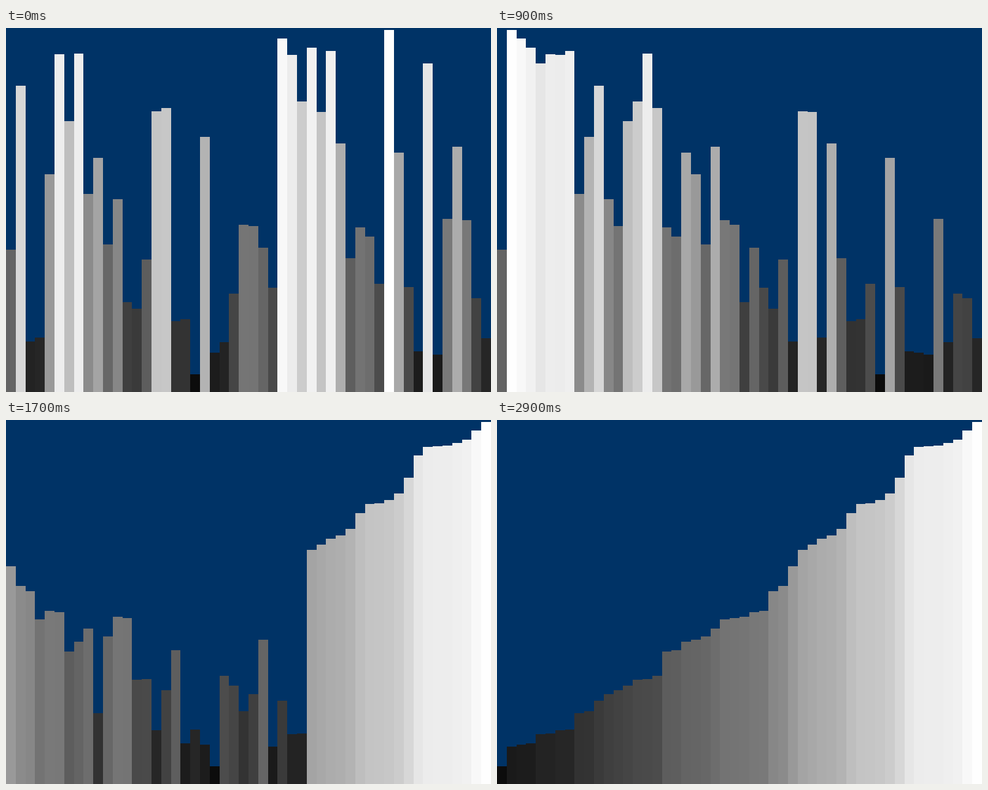
A matplotlib script for the animation above (3050 ms loop, 740x555 px).

```python
import matplotlib.pyplot as plt
import numpy as np
from matplotlib.animation import FuncAnimation

W, H, DPI = 740, 555, 100
FRAMES, INTERVAL = 61, 50
BACKGROUND = "#003366"

# Gap in pixels between each bar and the top of the stage
GAPS = [338, 88, 478, 472, 223, 40, 142, 39, 253, 198,
        330, 261, 418, 428, 353, 127, 122, 447, 444, 528,
        166, 495, 479, 405, 300, 302, 335, 396, 16, 41,
        112, 30, 128, 35, 176, 351, 304, 318, 390, 3,
        190, 395, 493, 54, 498, 291, 181, 293, 412, 473]


def sift_down(a, root, size):
    while (child := 2 * root + 1) < size:
        if child + 1 < size and a[child + 1] > a[child]:
            child += 1
        if a[root] >= a[child]:
            return
        a[root], a[child] = a[child], a[root]
        root = child


def heap_sort(values):
    """Yield the list before sorting and after every sift."""
    a = list(values)
    n = len(a)
    yield a[:]
    for root in reversed(range(n // 2)):
        sift_down(a, root, n)
        yield a[:]
    for end in range(n - 1, 0, -1):
        a[0], a[end] = a[end], a[0]
        sift_down(a, 0, end)
        yield a[:]


states = list(heap_sort(H - gap for gap in GAPS))

fig = plt.figure(figsize=(W / DPI, H / DPI), dpi=DPI, facecolor=BACKGROUND)
ax = fig.add_axes([0, 0, 1, 1])
ax.set(xlim=(0, W), ylim=(0, H))
ax.axis("off")

edges = np.round(np.linspace(0, W, len(GAPS) + 1))
bars = ax.bar(edges[:-1], states[0], width=np.diff(edges), align="edge",
              linewidth=0, antialiased=False)


def update(frame):
    # Five sorting steps for every four frames
    step = min((5 * frame + 6) // 4, len(states) - 1)
    for bar, height in zip(bars, states[step]):
        bar.set_height(height)
        bar.set_facecolor((height / H,) * 3)
    return bars.patches


anim = FuncAnimation(fig, update, frames=FRAMES, interval=INTERVAL,
                     repeat=True, repeat_delay=0)
plt.show()
```
